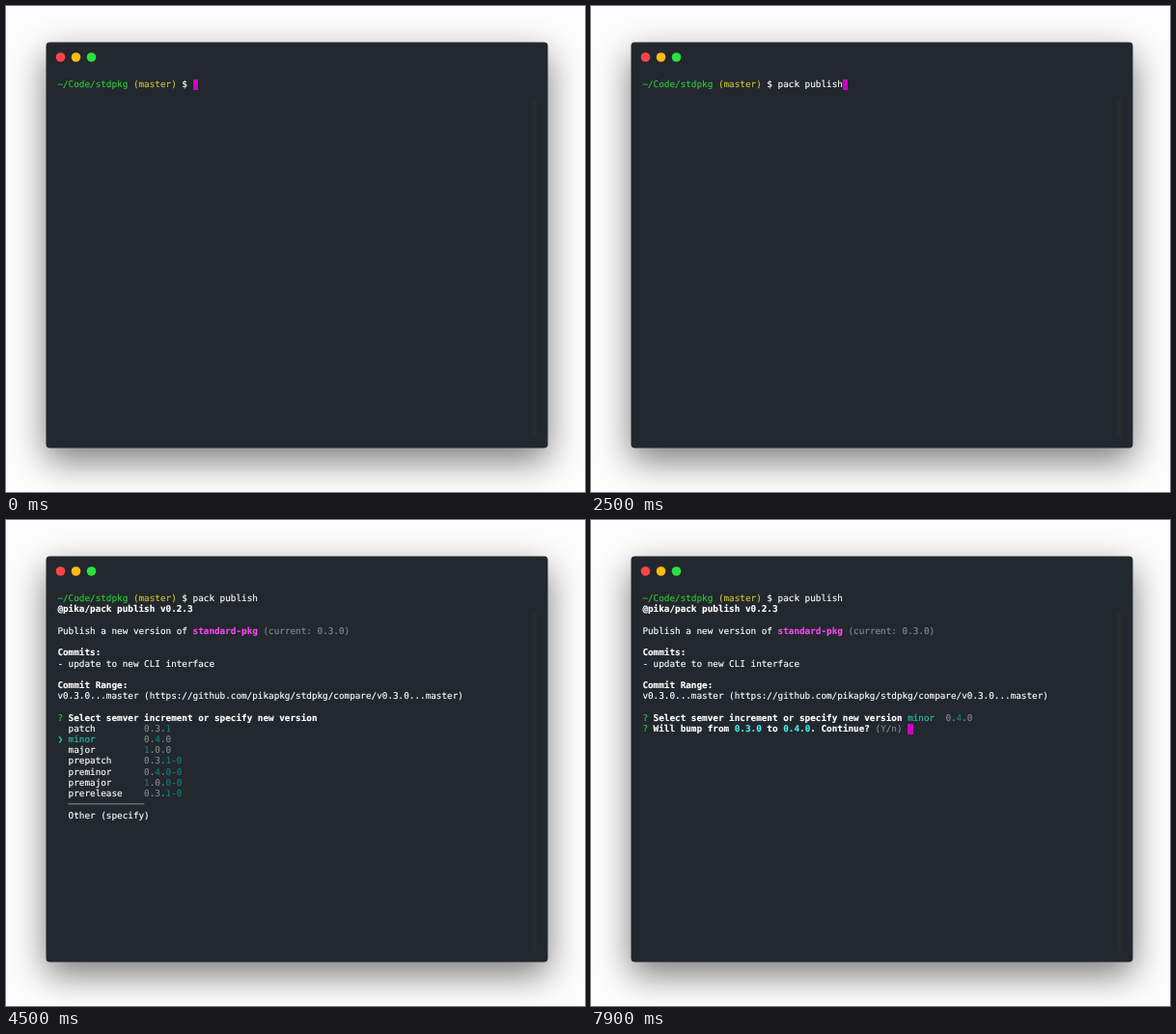
Animation of 600x503 px, one loop 8 s. Source, as an HTML page:

```html
<!DOCTYPE html>
<html lang="en">
<head>
<meta charset="utf-8">
<title>Terminal</title>
<style>
html, body { margin: 0; width: 100%; height: 100%; overflow: hidden; background: #fefdfe; }
svg { position: absolute; left: 0; top: 0; }
#window { fill: #23272e; filter: drop-shadow(0 13px 18px rgba(0, 0, 0, .52)); }
#screen { position: absolute; left: 53.4px; top: 76.2px; color: #fff; white-space: pre;
  font: 9.32px/11.22px "DejaVu Sans Mono", monospace; text-rendering: geometricPrecision;
  -webkit-text-stroke: .15px; }
#screen div { height: 11.22px; }
.path { color: #2cc936; }
.branch { color: #c5c22f; }
.dim { color: #85888c; }
.diff { color: #0d8279; }
.pick { color: #1fc5ac; }
.cyan { color: #40f3ee; font-weight: bold; }
.pink { color: #f04bea; font-weight: bold; }
.bold { color: #fff; font-weight: bold; }
.cursor { background: #ce00c4; }
.arrow { display: inline-block; width: 1ch; }
</style>
</head>
<body>
<svg width="600" height="503">
  <rect id="window" x="41.5" y="37.5" width="520" height="420" rx="4"/>
  <circle cx="56.5" cy="53" r="4.8" fill="#fd4447"/>
  <circle cx="72.5" cy="53" r="4.8" fill="#fcbc10"/>
  <circle cx="88.5" cy="53" r="4.8" fill="#2ddf3f"/>
  <rect x="545" y="96" width="5" height="350" fill="#292b2d"/>
</svg>
<div id="screen"></div>
<script>
const LOOP = 8000;
const COMMAND = 'pack publish';
// [start time, value] steps
const TYPED = [[0, 0], [1000, 1], [1200, 3], [1400, 4], [1600, 5], [1700, 6], [1800, 7],
  [1900, 8], [2100, 9], [2300, 10], [2400, 11], [2500, 12]];
const STAGE = [[0, 'typing'], [3000, 'started'], [3100, 'header'], [3300, 'list'], [7100, 'confirm']];
const SELECTED = [[0, 0], [4500, 1], [4700, 2], [4900, 1], [5500, 2], [6300, 1]];
// Brackets mark the changed parts of a version
const CHOICES = [['patch', '0.3.[1]'], ['minor', '0.[4].0'], ['major', '[1].0.0'],
  ['prepatch', '0.3.[1-0]'], ['preminor', '0.[4].[0-0]'], ['premajor', '[1].0.[0-0]'],
  ['prerelease', '0.3.[1-0]']];

const screen = document.getElementById('screen');
const at = (steps, t) => steps.filter(step => step[0] <= t).pop()[1];
const span = (name, text) => `<span class="${name}">${text}</span>`;
const version = text => span('dim', text.replace(/\[(.*?)\]/g, (_, part) => span('diff', part)));
const cursor = span('cursor', ' ');

function choiceRow([name, next], active) {
  const label = name.padEnd(14);
  return (active ? span('pick', span('arrow', '❯') + ' ' + label) : '  ' + label) + version(next);
}

function rows(t) {
  const stage = at(STAGE, t);
  const prompt = `${span('path', '~/Code/stdpkg')} ${span('branch', '(master)')} $ `;
  const first = prompt + COMMAND.slice(0, at(TYPED, t));
  if (stage === 'typing') return [first + cursor];
  if (stage === 'started') return [first, cursor];

  const header = [first, span('bold', '@pika/pack publish v0.2.3'), '',
    `Publish a new version of ${span('pink', 'standard-pkg')} ${span('dim', '(current: 0.3.0)')}`, ''];
  if (stage === 'header') return [...header, cursor];

  const mark = span('path', '?') + ' ';
  const question = mark + span('bold', 'Select semver increment or specify new version') + ' ';
  const summary = [...header, span('bold', 'Commits:'), '- update to new CLI interface', '',
    span('bold', 'Commit Range:'),
    'v0.3.0...master (https://github.com/pikapkg/stdpkg/compare/v0.3.0...master)', ''];
  if (stage === 'confirm') {
    return [...summary, question + span('pick', 'minor') + '  ' + version('0.[4].0'),
      mark + span('bold', `Will bump from ${span('cyan', '0.3.0')} to ${span('cyan', '0.4.0')}. Continue?`) +
      ' ' + span('dim', '(Y/n)') + ' ' + cursor];
  }
  const selected = at(SELECTED, t);
  return [...summary, question + (t < 4500 ? span('dim', '(Use arrow keys)') : ''),
    ...CHOICES.map((choice, i) => choiceRow(choice, i === selected)),
    '  ' + span('dim', '─'.repeat(14)), '  Other (specify)'];
}

let shown = '';
function draw(now) {
  const html = rows(now % LOOP).map(row => `<div>${row}</div>`).join('');
  if (html !== shown) screen.innerHTML = shown = html;
  requestAnimationFrame(draw);
}
draw(performance.now());
</script>
</body>
</html>
```
